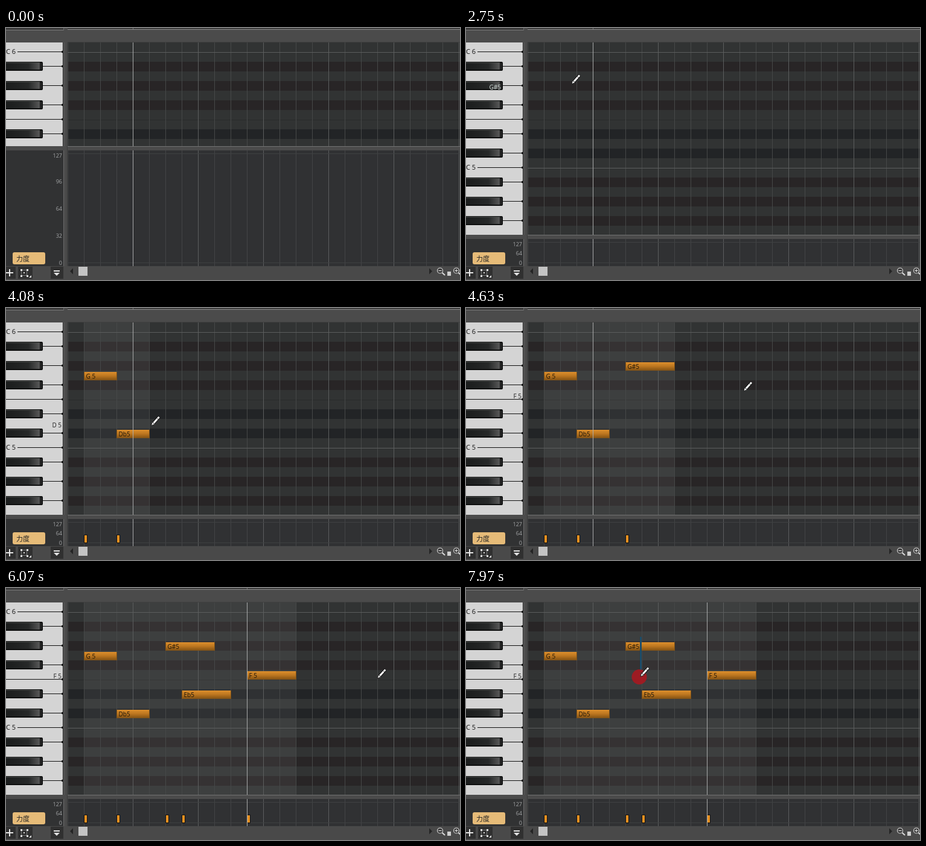
Recreate the animation shown at these times as an HTML page with a canvas. Size 752 px wide and 418 px high, loop 8000 ms.

```html
<!DOCTYPE html>
<html lang="zh">
<head>
<meta charset="utf-8">
<style>
html, body { margin: 0; width: 100%; height: 100%; overflow: hidden; background: #4b4b4b; }
canvas { display: block; }
</style>
</head>
<body>
<canvas id="stage" width="752" height="418"></canvas>
<script>
const ctx = document.getElementById('stage').getContext('2d');
const LOOP = 8000, W = 752, TOP = 24, ROW = 16, LEFT = 102, STEP = 27;
const OPEN = { t0: 2050, t1: 2450, y: 199, size: 147 };
const DRAG = 240, UNDO = 370, HOLD = 80;
const FONT = '"Open Sans", "Noto Sans", sans-serif';
const CJK = '"Noto Sans CJK SC", "Noto Sans CJK", sans-serif';
const NAMES = ['C', 'Db', 'D', 'Eb', 'E', 'F', 'F#', 'G', 'G#', 'A', 'Bb', 'B'];

const rowTop = row => TOP + row * ROW;
const column = i => LEFT + i * STEP;
const semitone = row => (120 - row) % 12;
const isBlack = row => NAMES[semitone(row)].length > 1;
const mix = (a, b, p) => a + (b - a) * p;
const ease = p => p * p * (3 - 2 * p);

// Rows count down from C6; lengths are grid steps
const note = (t0, row, col, steps) => ({ t0, t1: t0 + DRAG, row, x: column(col), steps });
const notes = [note(3020, 5, 1, 2), note(3820, 11, 3, 2), note(4200, 4, 6, 3), note(4760, 9, 7, 3), note(5600, 7, 11, 3)];

// Downward strokes that split the notes they cross
const strokes = [
  { t0: 6570, t1: 7130, x: 326, y: 140, len: 104, w: 7 },
  { t0: 7790, t1: 8050, x: 289, y: 81, len: 66, w: 3 }
];

const path = [
  [530, 476, 8], [1300, 54, 201], [1710, 55, 203],
  [OPEN.t0, 80, OPEN.y], [OPEN.t1, 80, OPEN.y + OPEN.size], [2740, 175, 93], [2830, 175, 93],
  [3500, 328, 140], [4560, 528, 125], [5170, 287, 177], [5450, 287, 177], [6040, 626, 150], [6290, 372, 150]
];
for (const n of notes) {
  const y = rowTop(n.row) + 2;
  path.push([n.t0, n.x + 1, y], [n.t1, n.x + n.steps * STEP + 2, y]);
}
for (const s of strokes) path.push([s.t0, s.x, s.y], [s.t1 - HOLD, s.x, s.y + s.len], [s.t1, s.x, s.y + s.len]);
path.sort((a, b) => a[0] - b[0]);

function pointer(t) {
  const i = Math.max(1, path.findIndex(p => p[0] >= t));
  const [ta, xa, ya] = path[i - 1], [tb, xb, yb] = path[i];
  const p = ease(Math.max(0, (t - ta) / (tb - ta)));
  return { x: mix(xa, xb, p), y: mix(ya, yb, p) };
}

function rect(x, y, w, h, color) {
  ctx.fillStyle = color;
  ctx.fillRect(x, y, w, h);
}

function pill(x, y, w, h, r, color) {
  ctx.fillStyle = color;
  ctx.beginPath();
  ctx.roundRect(x, y, w, h, r);
  ctx.fill();
}

function disc(x, y, r, color) {
  ctx.fillStyle = color;
  ctx.beginPath();
  ctx.arc(x, y, r, 0, 7);
  ctx.fill();
}

function text(s, x, y, size, color, align = 'left', font = FONT) {
  ctx.font = size + 'px ' + font;
  ctx.fillStyle = color;
  ctx.textAlign = align;
  ctx.fillText(s, x, Math.round(y + size * 0.36));
}

function line(points, color, width) {
  ctx.strokeStyle = color;
  ctx.lineWidth = width;
  ctx.beginPath();
  points.forEach(([x, y]) => ctx.lineTo(x, y));
  ctx.stroke();
}

function poly(points, fill, stroke) {
  ctx.beginPath();
  points.forEach(([x, y]) => ctx.lineTo(x, y));
  ctx.closePath();
  ctx.fillStyle = fill;
  ctx.fill();
  if (!stroke) return;
  ctx.strokeStyle = stroke;
  ctx.lineWidth = 1;
  ctx.stroke();
}

const triangle = (x, y, dx, dy, color) =>
  poly([[x, y], [x + dx - dy, y + dy - dx], [x + dx + dy, y + dy + dx]], color);

function clipTo(x, y, w, h, paint) {
  ctx.save();
  ctx.beginPath();
  ctx.rect(x, y, w, h);
  ctx.clip();
  paint();
  ctx.restore();
}

function gradient(x, y, dx, dy, ...colors) {
  const g = ctx.createLinearGradient(x, y, x + dx, y + dy);
  colors.forEach((c, i) => g.addColorStop(i / (colors.length - 1), c));
  return g;
}

function noteName(row) {
  const name = NAMES[semitone(row)];
  return name + (name.length > 1 ? '' : ' ') + (6 - Math.ceil(row / 12));
}

function wire(x, y) {
  rect(x, y, 94 - x, 1, '#111');
  disc(93.5, y + 0.5, 1.8, '#111');
}

function blackKey(y) {
  wire(61, y + 7);
  pill(-4, y, 65, 15, 2, '#0e0f0f');
  rect(0, y + 2, 56, 11, gradient(0, 0, 56, 0, '#1b1d1d', '#202222', '#272929', '#585858'));
  rect(0, y + 1, 56, 1, '#4a4d4b');
  rect(57, y + 2, 2, 11, '#2c2c2c');
}

function keys(bottom, hover) {
  clipTo(0, TOP, 95, bottom - TOP, () => {
    rect(0, TOP, 94, bottom - TOP, '#d4d4d4');
    rect(94, TOP, 1, bottom - TOP, '#161616');
    wire(0, 151);
    for (let r = 0; r < 20; r++) {
      const y = rowTop(r);
      if (isBlack(r)) blackKey(y);
      if (semitone(r)) continue;
      wire(19, y + 15);
      text(noteName(r), 0, y + 15, 11, '#111');
    }
    if (!hover || !semitone(hover)) return;
    const black = isBlack(hover);
    text(noteName(hover), black ? 58 : 92, rowTop(hover) + 10, 10, black ? '#d0dcd8' : '#222', 'right');
  });
}

function columns(y, h, minor, major) {
  for (let i = 0; i <= 24; i++) rect(column(i), y, 1, h, i && i % 4 === 0 ? major : minor);
}

function roll(bottom, list, end) {
  const h = bottom - TOP;
  clipTo(LEFT, TOP, W - LEFT, h, () => {
    rect(LEFT, TOP, W, h, '#313333');
    for (let r = 0; r < 20; r++) {
      if (isBlack(r)) rect(LEFT, rowTop(r), W, ROW, semitone(r) < 4 ? '#222426' : '#282526');
    }
    rect(LEFT, 152, W, 1, '#292b2b');
    if (end) rect(column(1), TOP, end - column(1), h, 'rgba(255,255,255,.06)');
    columns(TOP, h, '#464848', '#5c5e5e');
    [40, 232].forEach(y => rect(LEFT, y, W, 1, '#5b5d5d'));
    list.forEach(drawNote);
  });
}

function drawNote(n) {
  const y = rowTop(n.row) + 2, w = n.end - n.x;
  rect(n.x, y, w + 1, 14, '#80531a');
  rect(n.x + 1, y, w - 1, 13, gradient(0, y, 0, 13, '#dd8f2c', '#bd7720', '#8a5614'));
  text(noteName(n.row), n.x + 3.5, y + 7.5, 10, '#1c1408');
}

function lane(y, list) {
  const h = 395 - y, zero = y + 8.5;
  rect(0, y, 95, h, '#313233');
  rect(95, y, 1, h, '#6a6a6a');
  rect(LEFT, y, W, h, '#303133');
  columns(y, h, '#434446', '#5c5e5f');
  [y + 5, 389].forEach(v => rect(LEFT, v, W, 1, '#3f4142'));
  const gap = h > 90 ? 32 : 64;
  for (let v = 0; v <= 128; v += gap) {
    const value = Math.min(v, 127);
    text(value, 93, mix(389.5, zero, value / 127), 9, '#a2a4a5', 'right');
  }
  for (const n of list) {
    rect(n.x, 376, 6, 14, '#141414');
    rect(n.x + 1, 377, 4, 12, '#ea9120');
  }
  pill(11, 372, 54, 20, 3, '#e6bb78');
  text('力度', 17, 383, 11, '#222', 'left', CJK);
}

function magnifier(x, plus) {
  line([[x + 3.5, 406], [x + 8, 410]], '#ddd', 2);
  disc(x, 402.5, 5, '#ddd');
  disc(x, 402.5, 3.9, '#3c3c3c');
  rect(x - 2.5, 402, 5, 1, '#eee');
  if (plus) rect(x - 0.5, 400, 1, 5, '#eee');
}

function footer() {
  rect(0, 395, W, 23, '#494949');
  [[0, 16], [20, 24], [74, 21]].forEach(([x, w]) => rect(x, 396, w, 20, '#303030'));
  rect(0, 405, 12, 2, '#e6e6e6');
  rect(5, 400, 2, 12, '#e6e6e6');
  ctx.strokeStyle = '#777';
  ctx.lineWidth = 1;
  ctx.strokeRect(25.5, 401.5, 9, 9);
  for (const x of [24, 34]) for (const y of [400, 410]) rect(x, y, 3, 3, '#ddd');
  rect(29, 405, 2, 2, '#ddd');
  poly([[42, 410], [42, 414], [38, 414]], '#ddd');
  rect(79, 402, 10, 2, '#e0e0e0');
  triangle(84, 411, 0, -5, '#e0e0e0');
  triangle(106, 403.5, 5, 0, '#242424');
  triangle(706, 403.5, -5, 0, '#242424');
  rect(120, 396, 15, 15, '#c3c3c3');
  rect(731, 404, 6, 7, '#cfcfcf');
  magnifier(719, false);
  magnifier(746, true);
}

function frame(bottom) {
  rect(0, 0, W, 418, '#4b4b4b');
  rect(0, 0, 95, 3, '#3a3a3a');
  rect(0, 3, 96, 1, '#7a7a7a');
  rect(95, 0, 1, bottom, '#6a6a6a');
  rect(95, 4, 1, 20, '#4b4b4b');
  rect(LEFT, 0, W, 2, '#3a3a3a');
  rect(LEFT, 2, W, 1, '#8c8c8c');
  rect(101, TOP, 1, 371, '#3a3a3a');
  rect(LEFT, 23, W, 1, '#3f3f3f');
  rect(LEFT, bottom, W, 1, '#727272');
}

function pencil(x, y) {
  const body = [[x + 4, y - 4.5], [x + 13, y - 14.5]];
  poly([[x, y], [x + 1.5, y - 6], [x + 6, y - 2.5]], '#eee', '#222');
  line(body, '#111', 5);
  line(body, '#fff', 3);
  line([[x + 9.5, y - 12.5], [x + 12, y - 10]], '#222', 1);
}

function arrow(x, y) {
  const shape = [[0, 0], [0, 16], [3.7, 12.5], [6.2, 18.3], [8.6, 17.2], [6.2, 11.6], [11, 11.3]];
  poly(shape.map(([a, b]) => [x + a, y + b]), '#fff', '#222');
}

function resizer(x, y) {
  for (const s of [-1, 1]) {
    rect(x - 6, y + s * 2 - 1, 12, 2, '#fff');
    rect(x - 1, y + s * 5 - 3, 2, 6, '#fff');
    triangle(x, y + s * 10, 0, -s * 4, '#fff');
  }
}

function notesAt(t) {
  return notes.filter(n => t >= n.t0).flatMap(({ row, x, t1 }) => {
    const reach = pointer(Math.min(t, t1)).x - x;
    const end = x + STEP * Math.max(1, Math.round(reach / STEP));
    const cut = strokes.find(s => t >= s.t1 && t < s.t1 + UNDO && s.x > x && s.x < end);
    return cut ? [{ row, x, end: cut.x }, { row, x: cut.x, end }] : [{ row, x, end }];
  });
}

function drawStroke(s, p) {
  const x = s.x - (s.w - 1) / 2, h = Math.max(0, p.y - s.y);
  rect(x, s.y, s.w, h, 'rgba(24,66,92,.94)');
  rect(x + 1, s.y, s.w - 2, h, '#20597c');
  disc(p.x - 2, p.y + 0.5, 12.5, 'rgba(174,22,30,.86)');
}

function draw(t) {
  const p = pointer(t);
  const shift = t < OPEN.t0 ? 0 : t < OPEN.t1 ? Math.round(p.y - OPEN.y) : OPEN.size;
  const bottom = 196 + shift, visible = t >= path[0][0];
  const inRoll = visible && p.x >= LEFT && p.y >= TOP && p.y < bottom;
  const list = notesAt(t);
  const end = Math.max(0, ...list.map(n => n.end));
  // The playhead follows the last two notes drawn
  const head = notes.slice(3).reduce((x, n) => t >= n.t0 ? n.x : x, column(4));

  frame(bottom);
  keys(bottom, inRoll ? Math.floor((p.y - TOP) / ROW) : 0);
  roll(bottom, list, end);
  lane(bottom + 7, list);
  rect(head, 0, 1, 2, '#777');
  rect(head, TOP, 1, bottom - TOP, '#a9aaaa');
  rect(head, bottom + 7, 1, 388 - bottom, '#a9aaaa');
  footer();

  strokes.filter(s => t >= s.t0 && t < s.t1).forEach(s => drawStroke(s, p));
  if (!visible) return;
  if (inRoll) pencil(p.x, p.y);
  else if (p.y >= bottom && p.y < bottom + 6.5) resizer(p.x, p.y);
  else arrow(p.x, p.y);
}

const start = performance.now();
function tick() {
  draw((performance.now() - start) % LOOP);
  requestAnimationFrame(tick);
}
tick();
</script>
</body>
</html>
```
